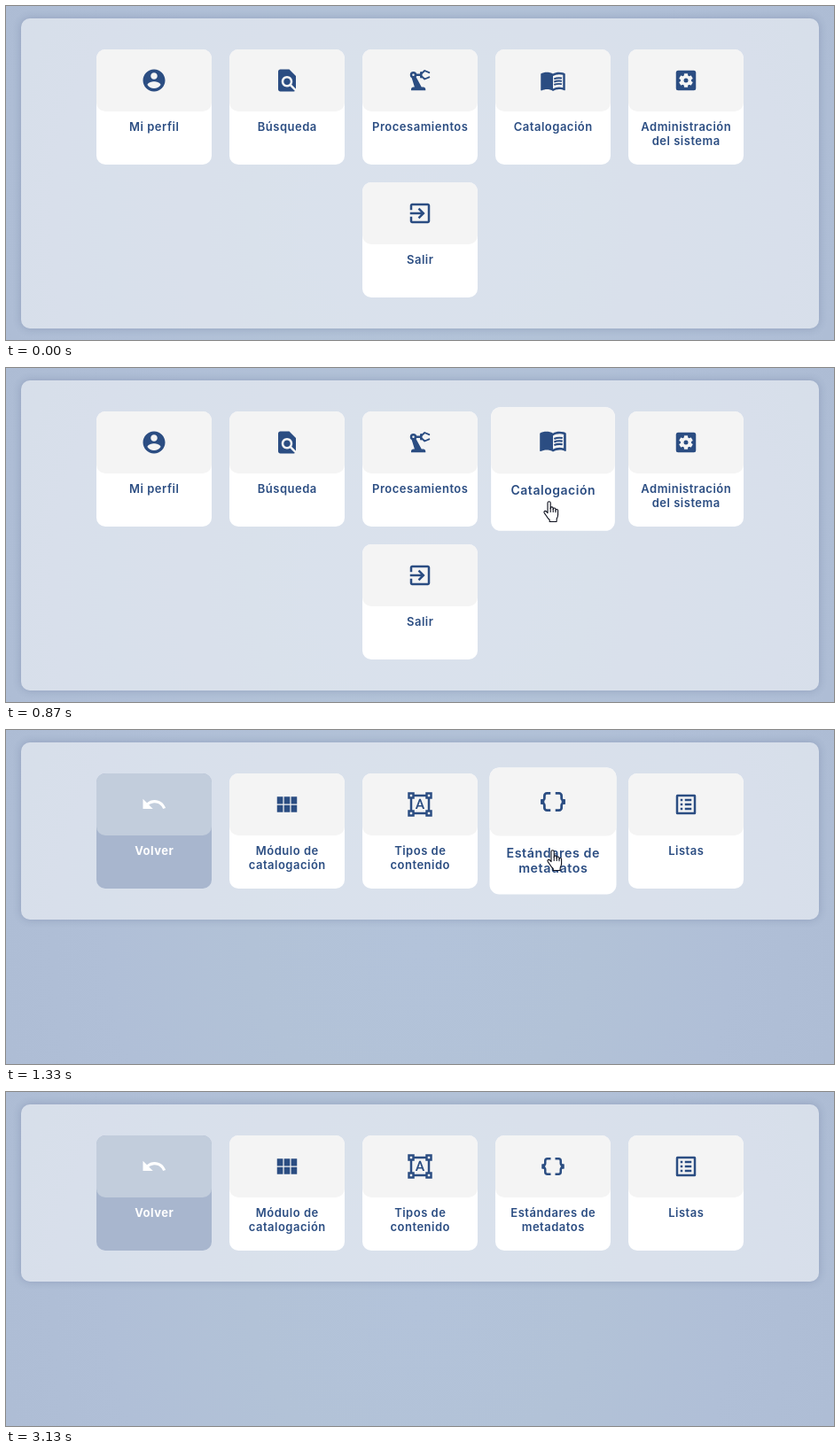
An HTML page that plays this animation: 934x377 px, repeating every 3800 ms.

```html
<!DOCTYPE html>
<html lang="es">
<head>
<meta charset="utf-8">
<title>Menú</title>
<style>
  html, body { margin: 0; width: 100%; height: 100%; overflow: hidden; }
  #stage {
    position: relative; width: 934px; height: 377px; overflow: hidden;
    background: radial-gradient(circle at 467px 245px, #b3c3da 0, #b2c2d7 190px, #b0bfd7 350px, #adbcd4 540px);
    font: 600 13px/16px Inter, "Open Sans", sans-serif;
    letter-spacing: .5px;
    color: #2b4d82;
  }
  .panel {
    position: absolute; left: 17px; top: 14px; width: 900px;
    border-radius: 10px; background: rgba(255, 255, 255, .515);
    box-shadow: 0 0 10px rgba(40, 60, 100, .22);
  }
  .card {
    position: absolute; width: 130px; height: 130px;
    border-radius: 10px; background: #fff; text-align: center;
  }
  .head { height: 70px; border-radius: 10px; background: #f4f4f4; }
  .head svg { position: absolute; left: 50px; top: 20px; width: 30px; height: 30px; fill: currentColor; }
  .label { margin-top: 9px; padding-left: .5px; white-space: nowrap; }
  .back { background: #a8b6ce; color: #fff; font-weight: 700; }
  .back .head { background: #c2cddc; }
  .hot { z-index: 1; }
  #hand { position: absolute; left: 0; top: 0; width: 18px; height: 25px; overflow: visible; z-index: 2; }
</style>
</head>
<body>
<div id="stage">
  <svg id="hand" viewBox="0 0 18 25" stroke="#0c0f1c" stroke-width="1.1" stroke-linejoin="round" stroke-linecap="round">
    <path fill="#fff" d="M5 13.6V2.3a1.6 1.6 0 0 1 3.2 0V8.4a1.5 1.5 0 0 1 3 0V9.4a1.4 1.4 0 0 1 2.8 0V10.8a1.3 1.3 0 0 1 2.6 0V15.5q0 2.4-1.3 4.4L15 23.5H7.2V21.5Q5 19.5 3.6 17L1.2 13.6q-.8-1.4.4-2.1 1.2-.5 2.1.7z"/>
    <path fill="none" d="M8.2 8.4v4M11.2 9.4v3M14 10.8v2"/>
  </svg>
</div>
<script>
const LOOP = 3800, FRAME = 1000 / 15;
const stage = document.getElementById('stage');
const hand = document.getElementById('hand');

const path = d => `<path d="${d}"/>`;
const line = (d, w, extra = '') =>
  `<path d="${d}" fill="none" stroke="currentColor" stroke-width="${w}" ${extra}/>`;
const round = 'stroke-linecap="round" stroke-linejoin="round"';

const icons = {
  user: path('M12 2C6.48 2 2 6.48 2 12s4.48 10 10 10 10-4.48 10-10S17.52 2 12 2zm0 3c1.66 0 3 1.34 3 3s-1.34 3-3 3-3-1.34-3-3 1.34-3 3-3zm0 14.2c-2.5 0-4.71-1.28-6-3.22.03-1.99 4-3.08 6-3.08s5.97 1.09 6 3.08c-1.29 1.94-3.5 3.22-6 3.22z'),
  search: path('M20 19.59V8l-6-6H6c-1.1 0-2 .9-2 2v16c0 1.1.9 2 2 2h12c.45 0 .85-.15 1.19-.4l-4.43-4.43c-.8.52-1.74.83-2.76.83-2.76 0-5-2.24-5-5s2.24-5 5-5 5 2.24 5 5c0 1.02-.31 1.96-.83 2.75zM9 13c0 1.66 1.34 3 3 3s3-1.34 3-3-1.34-3-3-3-3 1.34-3 3z'),
  robot: '<circle cx="6" cy="7" r="2" fill="none" stroke="currentColor" stroke-width="2"/>' +
    path('M4.5 9.5 7.1 18H6c-1.1 0-2 .9-2 2v1h13v-1c0-1.1-.9-2-2-2h-1.6L8.4 8.8z') +
    line('M8.5 7H12.5M13 5v4', 2, round) +
    line('M13.6 5.6 16.2 3.2 20.25 4.97M13.6 8.4 16.2 10.8 20.25 9.03', 1.5, round),
  book: path('M21 5c-1.1-.35-2.3-.5-3.5-.5-1.95 0-4.05.4-5.5 1.5-1.45-1.1-3.55-1.5-5.5-1.5S2.45 4.9 1 6v14.65c0 .25.25.5.75.45C3.1 20.45 5.05 20 6.5 20c1.95 0 4.05.4 5.5 1.5 1.35-.85 3.8-1.5 5.5-1.5 1.65 0 3.35.3 4.75 1.05.5.1.75-.2.75-.45V6c-.6-.45-1.25-.75-2-1zm0 13.5c-1.1-.35-2.3-.5-3.5-.5-1.7 0-4.15.65-5.5 1.5V8c1.35-.85 3.8-1.5 5.5-1.5 1.2 0 2.4.15 3.5.5z') +
    [0, 2.66, 5.33].map(y => line(`M13 ${10.66 + y}c1.2-.6 2.8-.91 4.5-.91q1.3 0 2.5.25`, 1.55)).join(''),
  gear: '<rect x="3" y="3" width="18" height="18" rx="2"/><g fill="#f4f4f4"><circle cx="12" cy="12" r="4.9"/>' +
    [0, 60, 120].map(a => `<rect x="10.3" y="5.75" width="3.4" height="12.5" rx=".4" transform="rotate(${a} 12 12)"/>`).join('') +
    '</g><circle cx="12" cy="12" r="2"/>',
  exit: path('M10.09 15.59L11.5 17l5-5-5-5-1.41 1.41L12.67 11H3v2h9.67zM19 3H5c-1.11 0-2 .9-2 2v4h2V5h14v14H5v-4H3v4c0 1.1.89 2 2 2h14c1.1 0 2-.9 2-2V5c0-1.1-.9-2-2-2z'),
  undo: path('M12.5 8c-2.65 0-5.05.99-6.9 2.6L2 7v9h9l-3.62-3.62c1.39-1.16 3.16-1.88 5.12-1.88 3.54 0 6.55 2.31 7.6 5.5l2.37-.78C21.08 11.03 17.15 8 12.5 8z'),
  grid: [3, 9.33, 15.67].map(x => path(`M${x} 5h5.33v6.5h-5.33zm0 7.5h5.33V19h-5.33z`)).join(''),
  shapes: path('M23 7V1h-6v2H7V1H1v6h2v10H1v6h6v-2h10v2h6v-6h-2V7zM3 3h2v2H3zm2 18H3v-2h2zm12-2H7v-2H5V7h2V5h10v2h2v10h-2zm4 2h-2v-2h2zM19 5V3h2v2zm-5.27 9h-3.49l-.73 2H7.89l3.4-9h1.4l3.41 9h-1.63zm-3.04-1.26h2.61L12 8.91z'),
  braces: ['', 'translate(24) scale(-1 1)'].map(m =>
    `<g transform="${m}">${line('M10 5H7a2 2 0 0 0-2 2v2a2 2 0 0 1-2 2H2m0 2h1a2 2 0 0 1 2 2v2a2 2 0 0 0 2 2h3', 2)}${path('M2 10h2l1.2 2L4 14H2z')}</g>`).join(''),
  list: '<rect x="4" y="4" width="16" height="16" rx=".3" fill="none" stroke="currentColor" stroke-width="2"/>' +
    [7, 11, 15].map(y => path(`M7 ${y}h2v2H7zm4 0h6v2h-6z`)).join('')
};

// Each card: icon, label, column, row
const home = makePanel(350, [
  ['user', 'Mi perfil', 0, 0],
  ['search', 'Búsqueda', 1, 0],
  ['robot', 'Procesamientos', 2, 0],
  ['book', 'Catalogación', 3, 0],
  ['gear', 'Administración<br>del sistema', 4, 0],
  ['exit', 'Salir', 2, 1]
]);
const sub = makePanel(200, [
  ['undo', 'Volver', 0, 0],
  ['grid', 'Módulo de<br>catalogación', 1, 0],
  ['shapes', 'Tipos de<br>contenido', 2, 0],
  ['braces', 'Estándares de<br>metadatos', 3, 0],
  ['list', 'Listas', 4, 0]
]);

function makePanel(height, cards) {
  const panel = document.createElement('div');
  panel.className = 'panel';
  panel.style.height = height + 'px';
  panel.innerHTML = cards.map(([icon, label, col, row]) => {
    const kind = icon === 'undo' ? ' back' : col === 3 ? ' hot' : '';
    return `<div class="card${kind}" style="left:${85 + col * 150}px;top:${35 + row * 150}px">` +
      `<div class="head"><svg viewBox="0 0 24 24">${icons[icon]}</svg></div>` +
      `<div class="label">${label}</div></div>`;
  }).join('');
  stage.insertBefore(panel, hand);
  return { panel, hot: panel.querySelector('.hot') };
}

// Pointer: time, left, top
const moves = [
  [400, 768, 362], [470, 742, 334], [530, 706, 292], [600, 666, 248],
  [670, 632, 212], [730, 611, 187], [800, 602, 166], [870, 606, 150],
  [930, 609, 139], [1000, 610, 136], [1130, 610, 135], [2330, 610, 136],
  [2800, 602, 143], [2870, 573, 178], [2930, 525, 242], [3000, 463, 314],
  [3070, 413, 366]
];
const LEAVE = 3130, SWAP = 1130;

// The standard CSS "ease" curve
function ease(p) {
  if (p <= 0) return 0;
  if (p >= 1) return 1;
  const bez = (a, b, u) => 3 * a * u * (1 - u) ** 2 + 3 * b * u * u * (1 - u) + u ** 3;
  let lo = 0, hi = 1;
  for (let i = 0; i < 20; i++) {
    const mid = (lo + hi) / 2;
    if (bez(.25, .25, mid) < p) lo = mid; else hi = mid;
  }
  return bez(.1, 1, lo);
}

const grow = (t, start) => ease((t - start) / 200);

function draw(now) {
  const step = Math.floor((now % LOOP) / FRAME + .06);
  const t = Math.round(step * FRAME / 10) * 10 % LOOP;

  home.panel.style.display = t < SWAP ? '' : 'none';
  sub.panel.style.display = t < SWAP ? 'none' : '';
  home.hot.style.transform = `scale(${1 + .1 * grow(t, 780)})`;
  sub.hot.style.transform = `scale(${1 + .1 * (grow(t, 1083) - grow(t, 2860))})`;

  const pos = t < LEAVE && moves.filter(m => m[0] <= t).pop();
  hand.style.display = pos ? '' : 'none';
  if (pos) hand.style.transform = `translate(${pos[1]}px, ${pos[2]}px)`;
}

const start = performance.now();
function tick() {
  draw(performance.now() - start);
  requestAnimationFrame(tick);
}
tick();
</script>
</body>
</html>
```
